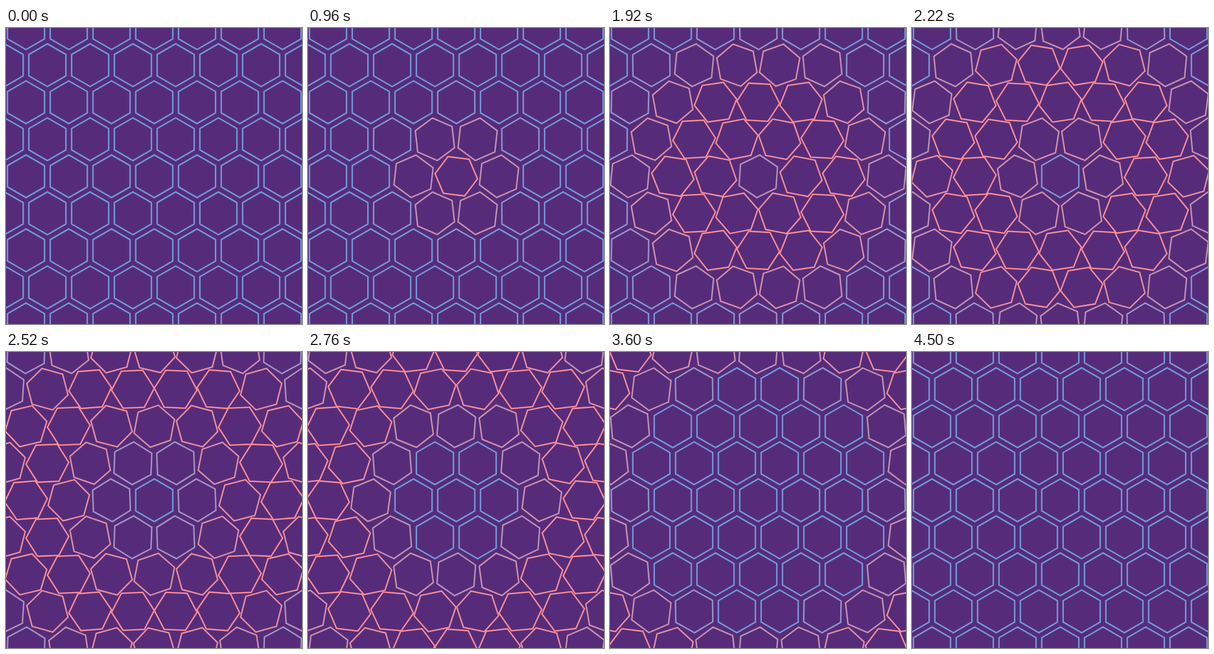
Animation of 540 by 540 pixels, one loop 4560 ms. Source, as an HTML page:

```html
<!DOCTYPE html>
<html lang="en">
<head>
<meta charset="utf-8">
<title>Honeycomb wave</title>
<style>
  html, body { margin: 0; width: 100%; height: 100%; overflow: hidden; background: #562c7a; }
  svg { display: block; width: 100vw; height: 100vh; }
</style>
</head>
<body>
<svg id="stage" viewBox="0 0 540 540">
  <rect width="540" height="540" fill="#562c7a"/>
  <g id="cells" fill="none" stroke-width="2.6" stroke-linejoin="miter"></g>
</svg>
<script>
const LOOP = 4560, STEP = 60, TURN = LOOP / 2;
const MID = 270.5, GAP = 78, RADIUS = 39;
const ROW = GAP * Math.sqrt(3) / 2;
const BLUE = [115, 154, 220], PINK = [255, 140, 148];

const corners = Array.from({ length: 6 }, (_, i) => {
  const a = (i + 0.5) * Math.PI / 3;
  return `${(RADIUS * Math.cos(a)).toFixed(3)},${(RADIUS * Math.sin(a)).toFixed(3)}`;
}).join(' ');

const group = document.getElementById('cells');
const cells = [];

function addCell(x, y, dir) {
  const el = document.createElementNS('http://www.w3.org/2000/svg', 'polygon');
  el.setAttribute('points', corners);
  group.appendChild(el);
  cells.push({ el, x, y, dir, dist: Math.hypot(x, y) });
}

for (let row = -4; row <= 4; row++) {
  const odd = Math.abs(row) % 2;
  for (let col = -3; col <= 3 + odd; col++) {
    addCell((col - odd / 2) * GAP, row * ROW, col % 2 ? 1 : -1);
  }
}

// The wave reaches the outermost cell halfway through the loop.
const reach = Math.hypot(3 * GAP, 4 * ROW);
const clamp = v => Math.min(1, Math.max(0, v));
const ease = p => p * p * (3 - 2 * p);
const mix = k => `rgb(${BLUE.map((c, i) => Math.round(c + (PINK[i] - c) * k)).join(',')})`;

function render(t) {
  for (const { el, x, y, dir, dist } of cells) {
    const p = clamp((t - (LOOP - TURN) * dist / reach) / TURN);
    const angle = dir * 60 * ease(p);
    el.setAttribute('transform', `translate(${MID + x} ${MID + y}) rotate(${angle})`);
    el.setAttribute('stroke', mix(Math.sin(Math.PI * p)));
  }
}

const start = performance.now();
function tick() {
  const t = (performance.now() - start) % LOOP;
  render(Math.floor(t / STEP) * STEP);
  requestAnimationFrame(tick);
}
render(0);
requestAnimationFrame(tick);
</script>
</body>
</html>
```
